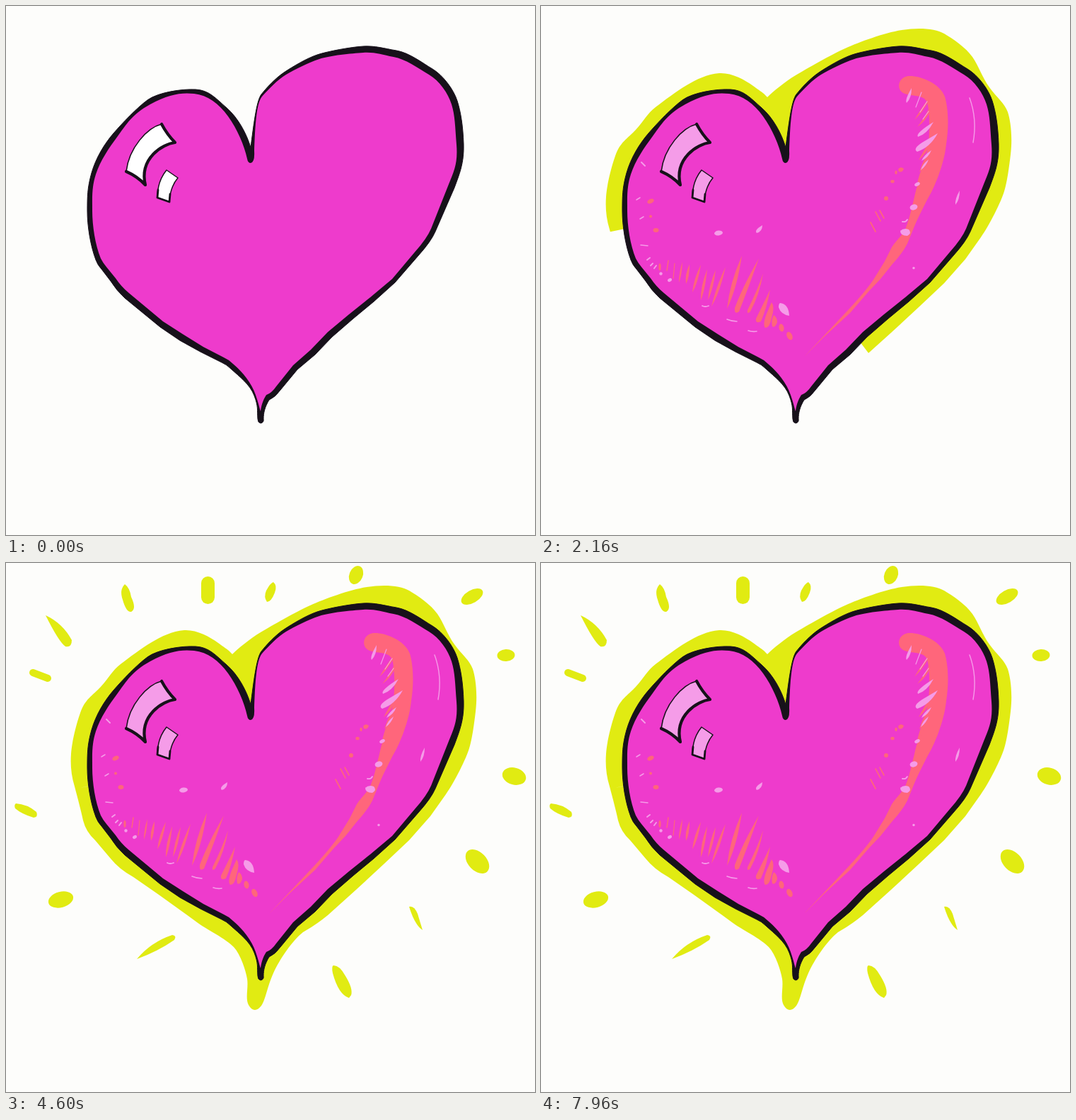
An HTML page without scripts for the animation above (8000 ms loop, 748 px wide and 748 px high).

```html
<!DOCTYPE html>
<html lang="en">
<head>
<meta charset="utf-8">
<title>Heart drawing</title>
<style>
@property --t { syntax: "<number>"; inherits: true; initial-value: 0; }
@keyframes clock { to { --t: 8000; } }
html, body { margin: 0; width: 100%; height: 100%; overflow: hidden; background: #fdfdfb; }
svg {
  --ink: #17111a; --pink: #ee3bcc; --coral: #ff667b; --light: #f59ce8; --lime: #e1eb12;
  display: block; width: 100%; height: 100%;
  animation: clock 8s steps(200) infinite;
}
/* each mark appears at its own time, --at in ms */
.marks > * { opacity: clamp(0, var(--t) - var(--at), 1); }
/* a brush uncovers its shape from --at on, for --span ms */
.brush {
  fill: none; stroke: #fff; stroke-dasharray: 100px 110px;
  stroke-dashoffset: calc((100 - 100 * clamp(0, (var(--t) - var(--at)) / var(--span), 1)) * 1px);
}
.line { fill: none; stroke-linecap: round; stroke-linejoin: round; }
.coral { fill: var(--coral); }
.coral .line { fill: none; stroke: var(--coral); }
.light { fill: var(--light); }
.light .line { fill: none; stroke: var(--light); }
.lime { fill: var(--lime); }
.lime .line { fill: none; stroke: var(--lime); }
</style>
</head>
<body>
<svg viewBox="0 0 748 748">
<defs>
  <mask id="glowMask" maskUnits="userSpaceOnUse" x="0" y="0" width="748" height="748">
    <path class="brush" style="--at:1680;--span:710" stroke-width="60" pathLength="100" d="M104 318C88 240 125 185 175 145S270 85 308 152L338 205L342 135C355 110 385 85 410 77S480 50 515 47S585 65 605 90S640 130 648 160S650 240 645 280S610 350 590 372S520 435 495 455S430 505 410 520S370 575 362 600L352 636L346 595C338 560 325 530 305 518S240 475 220 459S155 408 140 392S110 350 104 318"/>
  </mask>
  <mask id="shineMask" maskUnits="userSpaceOnUse" x="340" y="80" width="260" height="440">
    <path class="brush" style="--at:130;--span:210" stroke-width="46" pathLength="100" d="M500 111C580 104 560 160 560 190S532 290 517 325S450 420 368 500"/>
  </mask>
  <path id="bigGloss" d="M220 167Q228 182 239 193C222 195 188 215 197 253Q186 241 170 234C174 200 200 172 220 167Z"/>
  <path id="smallGloss" d="M227 232L243 243Q232 256 231 277L214 271Q214 248 227 232Z"/>
</defs>

<path class="lime" mask="url(#glowMask)" d="M97 316C92 300 91 285 92 270S98 232 105 212S122 188 134 175S150 152 162 143S192 120 206 112S235 96 252 95S288 104 300 113S314 122 320 129C328 121 345 107 360 98S410 69 430 60S485 38 510 34S558 32 570 39S601 59 610 72S624 101 634 115S656 138 660 150S667 185 664 210S659 248 655 262S634 310 622 327L600 358L570 392L535 425L495 462L455 498Q438 512 420 522C405 534 387 560 378 580S367 618 361 626S348 634 343 625S343 600 341 588S332 554 322 543S282 517 270 508L248 492L216 469L180 444Q160 433 148 418L126 392Q113 380 109 364C106 350 102 335 97 316Z"/>

<!-- heart: ink silhouette, then the pink inside -->
<path fill="var(--ink)" stroke="var(--ink)" stroke-linejoin="round" d="M346 200C340 180 328 158 312 144S287 119 268 118S215 122 200 133S165 165 152 180S127 215 121 236S115 270 115 290S119 338 127 359Q130 367 135 372L148 389Q156 402 168 413L218 454L246 473L275 489L305 504Q312 507 318 513C330 524 345 535 351 551S355 570 356 584Q356 589 360 590Q365 589 364 584C364 575 366 567 372 557Q381 553 388 543L412 514L437 493L461 468L491 442L520 418L550 391L583 353Q601 333 607 319L634 257C641 238 648 222 647 195S643 150 638 134S618 98 603 89S570 66 552 63S522 56 505 57S455 64 440 69S405 86 393 94S368 116 361 125S350 170 346 200Z"/>
<path fill="var(--pink)" d="M341 216C337 197 327 174 314 156S285 126 266 124S230 125 204 139S170 168 158 184S133 219 127 238S122 270 122 290S126 338 134 357Q137 363 142 369L155 385Q163 397 174 406L222 446L250 464L279 482L308 497Q315 500 321 506C333 516 347 532 353 550S357 564 360 573C361 565 363 558 368 550Q376 547 382 538L406 508L431 486L455 461L485 436L515 412L546 386L578 348Q595 329 601 315L626 252C634 232 639 222 637 196S635 155 630 139S613 106 598 97S565 75 548 72S522 65 505 66S458 70 443 75S408 90 396 97S371 118 362 128S352 180 351 205Q352 221 346 222Q342 222 341 216Z"/>

<!-- gloss windows -->
<g fill="#fff"><use href="#bigGloss"/><use href="#smallGloss"/></g>
<g class="light marks"><use href="#bigGloss" style="--at:50"/><use href="#smallGloss" style="--at:90"/></g>
<g class="line" stroke="var(--ink)">
  <use href="#bigGloss" stroke-width="1.6"/>
  <use href="#smallGloss" stroke-width="1.5"/>
  <path stroke-width="4.2" d="M220 167Q228 182 239 193C222 195 188 215 197 253Q186 241 170 234"/>
  <path stroke-width="2.8" d="M215 260L214 271L231 277L232 266"/>
</g>

<!-- coral shading -->
<path class="coral" mask="url(#shineMask)" d="M519 99C505 101 502 117 512 123C525 129 540 124 546 136C551 155 550 195 544 215C540 230 531 255 528 270C523 290 520 305 514 318C508 327 500 334 496 341L486 361L470 387Q460 402 436 428L372 496L400 468L437 434L463 404L480 386L496 366Q511 350 518 336C524 322 529 308 534 298L546 274Q558 254 566 228C570 215 572 205 573 195C577 170 576 145 571 128C563 108 535 98 519 99Z"/>
<g class="coral marks">
  <ellipse style="--at:350" cx="351.5" cy="466.5" rx="3.8" ry="6.2" transform="rotate(-25 351.5 466.5)"/>
  <ellipse style="--at:370" cx="340" cy="455" rx="3.5" ry="5.5" transform="rotate(-12 340 455)"/>
  <path style="--at:390" d="M329 437Q334 440 334 447Q331 456 327 453Q325 445 329 437Z"/>
  <path style="--at:420" d="M326 419Q331 425 326 441Q323 456 317 455Q313 451 319 435Z"/>
  <path style="--at:450" d="M324 401Q319 428 311 446Q303 450 304 442Q315 420 324 401Z"/>
  <path style="--at:470" d="M314 378Q309 408 296 432Q291 437 292 430Q306 402 314 378Z"/>
  <path style="--at:500" d="M308 357Q292 402 280 432Q273 437 274 427Q285 397 308 357Z"/>
  <path style="--at:530" d="M284 353Q277 400 263 428Q267 391 284 353Z"/>
  <path style="--at:560" d="M261 369Q253 405 241 425Q248 395 261 369Z"/>
  <path style="--at:580" d="M247 373Q244 400 236 416Q238 393 247 373Z"/>
  <path style="--at:600" d="M235 372Q232 402 226 416Q225 398 235 372Z"/>
  <path style="--at:620" d="M226 366Q222 392 214 405Q216 385 226 366Z"/>
  <path style="--at:650" d="M210 365Q210 384 205 393Q203 380 210 365Z"/>
  <path style="--at:670" d="M200 362Q199 382 195 391Q195 376 200 362Z"/>
  <path class="line" style="--at:690" stroke-width="1.2" d="M189 364L187 385"/>
  <path class="line" style="--at:710" stroke-width="1.5" d="M180 360L178 374"/>
  <ellipse style="--at:740" cx="168" cy="369" rx="1.6" ry="5"/>

  <ellipse style="--at:850" cx="162.5" cy="317" rx="4" ry="3"/>
  <circle style="--at:880" cx="155" cy="297.5" r="2"/>
  <ellipse style="--at:910" cx="155" cy="276" rx="5" ry="3" transform="rotate(-25 155 276)"/>
  <path class="line" style="--at:940" stroke-width="1.8" d="M466 306L473 319"/>
  <path class="line" style="--at:960" stroke-width="1.6" d="M473 291L480 304M479 289L485 300"/>
  <circle style="--at:1000" cx="488" cy="272" r="3"/>
  <ellipse style="--at:1030" cx="497" cy="248" rx="2.7" ry="2.3"/>
  <path style="--at:1060" d="M501 233Q505 232 503 238Q499 238 501 233ZM505 231Q508 226 513 230Q511 236 506 234Z"/>
  <path style="--at:1090" d="M549 133Q540 150 528 161Q538 144 547 132ZM551 147Q545 162 532 171Q541 160 548 146Z"/>
  <path style="--at:1120" d="M551 194Q546 208 534 218Q540 206 549 192ZM549 209Q546 224 535 235Q538 224 545 211ZM544 222Q543 238 532 251Q534 240 540 226Z"/>
</g>

<!-- light sparkles -->
<g class="light marks">
  <path style="--at:1150" d="M524 116Q524 130 517 137Q514 133 524 116Z"/>
  <path class="line" style="--at:1170" stroke-width="1.2" d="M538 122L530 143M546 135L536 150M548 149L540 160"/>
  <path style="--at:1200" d="M555 164Q546 181 533 185Q529 180 555 164Z"/>
  <path style="--at:1220" d="M561 180Q550 200 532 206Q525 202 539 193Z"/>
  <path style="--at:1240" d="M552 204Q548 214 538 219Q541 211 552 204ZM548 217Q545 226 537 232Q539 224 548 217Z"/>
  <ellipse style="--at:1260" cx="532" cy="252" rx="4" ry="2.6" transform="rotate(-25 532 252)"/>
  <ellipse style="--at:1280" cx="527" cy="284.5" rx="5.5" ry="4" transform="rotate(-15 527 284.5)"/>
  <path class="line" style="--at:1300" stroke-width="1.8" d="M511 305Q516 306 518 302"/>
  <path style="--at:1320" d="M508 318Q513 313 520 316Q525 321 518 325Q508 325 508 318Z"/>
  <circle style="--at:1340" cx="527" cy="370.5" r="1.7"/>
  <path class="line" style="--at:1360" stroke-width="1.4" d="M606 130Q617 160 611 193"/>
  <path style="--at:1380" d="M592 261Q592 274 586 281Q585 273 592 261Z"/>
  <path style="--at:1420" d="M338 420Q350 421 351 438Q339 436 336 426Q336 421 338 420Z"/>
  <path style="--at:1440" d="M313 310Q313 319 305 321Q301 317 313 310Z"/>
  <ellipse style="--at:1460" cx="251" cy="321" rx="6" ry="3.5" transform="rotate(-8 251 321)"/>
  <path class="line" style="--at:1480" stroke-width="1.6" d="M293 459Q299 461 305 460M263 443Q270 446 277 446"/>
  <path class="line" style="--at:1510" stroke-width="1.8" d="M228 424Q232 426 237 424"/>
  <ellipse style="--at:1530" cx="182" cy="387.5" rx="3.2" ry="2.2" transform="rotate(-30 182 387.5)"/>
  <circle style="--at:1550" cx="169.5" cy="378.5" r="2.2"/>
  <path class="line" style="--at:1570" stroke-width="2" d="M160 371L163 367M155 367L158 364M150 359L154 356"/>
  <path class="line" style="--at:1590" stroke-width="1.6" d="M141 338L151 339"/>
  <path class="line" style="--at:1610" stroke-width="1.5" d="M140 301L145 298M135 274L140 271"/>
  <path class="line" style="--at:1630" stroke-width="2" d="M142 221L147 226"/>
</g>

<!-- rays, clockwise -->
<g class="lime marks">
  <ellipse style="--at:2490" cx="659" cy="47.5" rx="17" ry="9" transform="rotate(-30 659 47.5)"/>
  <ellipse style="--at:2510" cx="707" cy="130.5" rx="12.5" ry="8.5" transform="rotate(-4 707 130.5)"/>
  <ellipse style="--at:2570" cx="718.5" cy="301.5" rx="17" ry="12" transform="rotate(15 718.5 301.5)"/>
  <ellipse style="--at:2635" cx="666.5" cy="422" rx="20" ry="13" transform="rotate(46 666.5 422)"/>
  <path style="--at:2700" d="M570 486Q577 484 582 496L589 519Q578 512 570 486Z"/>
  <path style="--at:2765" d="M463 569Q472 569 480 584Q491 602 488 611L485 615Q470 610 462 580Q460 570 463 569Z"/>
  <path style="--at:2830" d="M185 560Q205 536 235 526Q242 527 238 533Q215 549 185 560Z"/>
  <ellipse style="--at:2895" cx="77.5" cy="476" rx="18" ry="11" transform="rotate(-15 77.5 476)"/>
  <path style="--at:2960" d="M14 340Q30 341 43 352Q46 359 39 360Q22 355 13 347Q11 342 14 340Z"/>
  <path class="line" style="--at:3025" stroke-width="10" d="M38 155L59 163"/>
  <path style="--at:3090" d="M56 74Q80 85 93 109Q93 120 84 118Q75 112 56 74Z"/>
  <path style="--at:3155" d="M168 30Q175 35 177 48Q185 65 177 69Q170 70 165 52Q160 38 168 30Z"/>
  <rect style="--at:3220" x="276" y="19" width="19" height="39" rx="9.5"/>
  <path style="--at:3285" d="M378 27Q384 32 380 42Q375 55 369 55Q364 48 368 39Q374 28 378 27Z"/>
  <ellipse style="--at:3350" cx="495" cy="17" rx="9.5" ry="13.5" transform="rotate(22 495 17)"/>
</g>
</svg>
</body>
</html>
```
